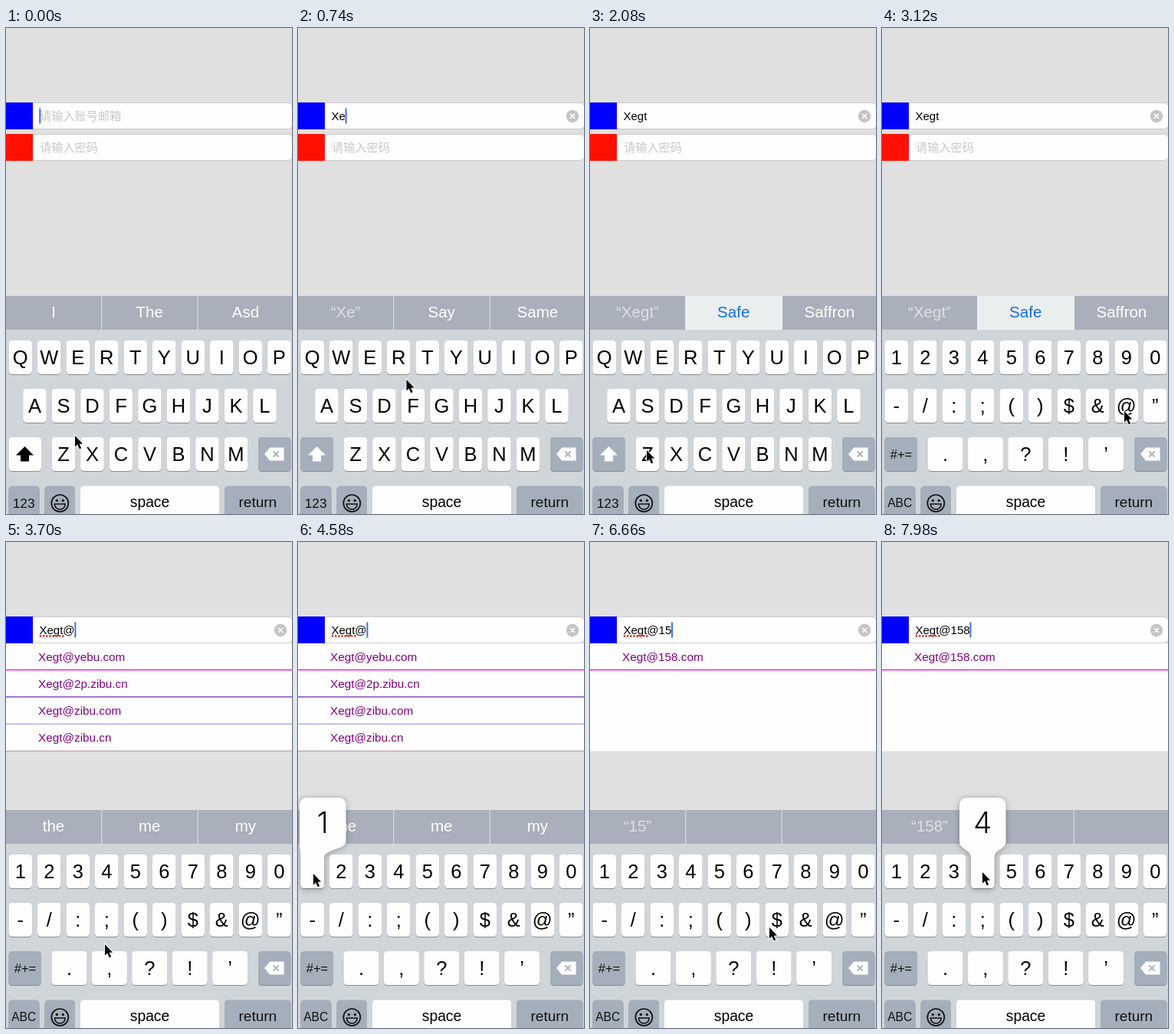
An HTML page with a canvas for the animation above (8000 ms loop, 373 px wide and 633 px high).

```html
<!DOCTYPE html>
<html lang="zh">
<head>
<meta charset="utf-8">
<style>
html, body { margin: 0; width: 100%; height: 100%; overflow: hidden; background: #e0e0e0; }
canvas { display: block; width: 373px; height: 633px; }
</style>
</head>
<body>
<canvas id="stage"></canvas>
<script>
const W = 373, H = 633, LOOP = 8000, TICK = 147.9;
const SANS = '"Liberation Sans", sans-serif';
const CJK = '"Noto Sans CJK SC", "Noto Sans CJK", sans-serif';
const GRAY_KEY = '#a5aebb', BAR = '#a9b0bb';

const canvas = document.getElementById('stage');
const ctx = canvas.getContext('2d');
const dpr = window.devicePixelRatio || 1;
canvas.width = W * dpr;
canvas.height = H * dpr;
ctx.scale(dpr, dpr);

// All schedules are [tick, value...]; the latest entry reached is current.
const typed = [[0, ''], [3, 'X'], [5, 'Xe'], [7, 'Xeg'], [10, 'Xegt'],
  [23, 'Xegt@'], [32, 'Xegt@1'], [43, 'Xegt@15'], [52, 'Xegt@158']];
const hints = [[0, 'I', 'The', 'Asd'], [3, '“X”', 'Say', 'See'], [5, '“Xe”', 'Say', 'Same'],
  [7, '“Xeg”', 'Safe', 'Sailor'], [10, '“Xegt”', 'Safe', 'Saffron'], [23, 'the', 'me', 'my'],
  [33, '“1”', '', ''], [43, '“15”', '', ''], [52, '“158”', '', '']];
const pointer = [[0, 90, 531], [2, 114, 550], [4, 95, 432], [6, 188, 484], [8, 189, 483],
  [9, 170, 432], [11, 170, 436], [16, 22, 612], [17, 22, 612], [21, 316, 499], [22, 316, 495],
  [25, 129, 524], [30, 20, 432], [32, 20, 432], [35, 39, 448], [40, 60, 445], [42, 168, 432],
  [43, 168, 434], [45, 234, 502], [48, 335, 540], [51, 282, 432], [52, 280, 433], [54, 131, 430]];
const presses = { 2: 'X', 4: 'E', 6: 'G', 9: 'T', 22: '@', 31: '1', 42: '5', 51: '8', 54: '4' };
const NUMBERS_AT = 17, LIST_AT = 23;

const domains = ['yebu.com', '2p.zibu.cn', 'zibu.com', 'zibu.cn', '172.com', '158.com', '134.com'];
const ruleColors = ['#f200dc', '#6c22ae', '#9c9cf4', '#b8a0a0'];

const current = (list, n) => list.filter(e => e[0] <= n).pop();

function text(str, x, y, size, color, align = 'center', family = SANS) {
  ctx.font = `${size}px ${family}`;
  ctx.fillStyle = color;
  ctx.textAlign = align;
  ctx.fillText(str, x, y);
}

function rect(x, y, w, h, color) {
  ctx.fillStyle = color;
  ctx.fillRect(x, y, w, h);
}

function round(x, y, w, h, r, color) {
  ctx.fillStyle = color;
  ctx.beginPath();
  ctx.roundRect(x, y, w, h, r);
  ctx.fill();
}

function disc(x, y, r, color) {
  ctx.fillStyle = color;
  ctx.beginPath();
  ctx.arc(x, y, r, 0, 7);
  ctx.fill();
}

function polygon(points, color) {
  ctx.fillStyle = color;
  ctx.beginPath();
  points.forEach(([x, y]) => ctx.lineTo(x, y));
  ctx.closePath();
  ctx.fill();
}

function cross(x, y, r, color, width) {
  ctx.strokeStyle = color;
  ctx.lineWidth = width;
  ctx.beginPath();
  ctx.moveTo(x - r, y - r); ctx.lineTo(x + r, y + r);
  ctx.moveTo(x + r, y - r); ctx.lineTo(x - r, y + r);
  ctx.stroke();
}

function key(x, y, w, color = '#fefefe') {
  round(x, y + 1, w, 44, 4.5, '#8b8f94');
  round(x, y, w, 44, 4.5, color);
}

function field(y, swatch) {
  round(0, y, W, 35, 5, '#cdcdcd');
  round(0.5, y + 1, W - 0.5, 33, 5, '#fefefe');
  rect(0, y, 35, 35, swatch);
}

function drawFields(n) {
  const [since, value] = current(typed, n);
  field(97, '#0000ff');
  field(138, '#ff1000');
  text('请输入密码', 44, 161, 15.2, '#c9c9cd', 'left', CJK);
  if (value) {
    text(value, 43.5, 120, 15, '#000', 'left');
    disc(358, 115, 8.2, '#c4c4c6');
    cross(358, 115, 3, '#fff', 1.7);
  } else {
    text('请输入账号邮箱', 44, 120, 15.2, '#c9c9cd', 'left', CJK);
  }
  if (n >= LIST_AT) {
    for (let x = 45; x < 76; x += 4.2) disc(x, 122.5, 1.4, '#e8392c');
  }
  if ((n - since) % 7 < 4) {
    ctx.font = `15px ${SANS}`;
    rect(43.3 + ctx.measureText(value).width, 104.5, 2, 20, '#426bf2');
  }
}

function drawList(n) {
  if (n < LIST_AT) return;
  const prefix = current(typed, n)[1].split('@')[1];
  const matches = prefix ? domains.filter(d => d.startsWith(prefix)) : domains.slice(0, 4);
  rect(0, 132, W, 140.5, '#fefefe');
  rect(35, 131, W - 35, 1, '#cfcfcf');
  matches.forEach((domain, i) => {
    text('Xegt@' + domain, 42, 155 + 35 * i, 15.3, '#800080', 'left');
    rect(0, 166 + 35.2 * i, W, 1.2, ruleColors[i]);
  });
}

function drawHints(n) {
  const [since, ...words] = current(hints, n);
  const corrected = since === 10;
  rect(0, 349, W, 44, BAR);
  rect(124, 349, 1.3, 44, '#d3d8dd');
  rect(249.6, 349, 1.3, 44, '#d3d8dd');
  if (corrected) rect(124, 349, 127, 44, '#ebeeef');
  words.forEach((word, i) => {
    const color = word[0] === '“' ? '#dce0e4' : corrected && i === 1 ? '#126fe6' : '#fff';
    text(word, 62 + 125.2 * i, 376.5, 20.5, color);
  });
}

function layout(n) {
  const row = (chars, x, y, pitch = 37.5, w = 30.5) =>
    [...chars].map((label, i) => ({ label, x: x + pitch * i, y, w }));
  return n >= NUMBERS_AT
    ? [...row('1234567890', 3.5, 407), ...row('-/:;()$&@”', 3.5, 470), ...row('.,?!’', 59.5, 533, 52.4, 46)]
    : [...row('QWERTYUIOP', 3.5, 407), ...row('ASDFGHJKL', 22.2, 470), ...row('ZXCVBNM', 59.7, 533)];
}

function drawShift(active) {
  key(3.5, 533, 42.5, active ? '#fefefe' : GRAY_KEY);
  polygon([[24.5, 545], [36, 556.5], [30, 556.5], [30, 564.5], [19, 564.5], [19, 556.5], [13, 556.5]],
    active ? '#000' : '#fff');
}

function drawSmiley(x, y) {
  ctx.strokeStyle = '#111';
  ctx.lineWidth = 1.7;
  ctx.beginPath();
  ctx.arc(x, y, 11, 0, 7);
  ctx.stroke();
  disc(x - 4, y - 3.5, 1.7, '#111');
  disc(x + 4, y - 3.5, 1.7, '#111');
  ctx.lineWidth = 1.5;
  ctx.beginPath();
  ctx.arc(x, y + 1, 7, 0, Math.PI);
  ctx.closePath();
  ctx.stroke();
}

function drawKeyboard(n) {
  const numbers = n >= NUMBERS_AT;
  rect(0, 393, W, 240, '#d0d5d9');
  const keys = layout(n);
  const pressed = keys.find(k => k.label === presses[n]);
  for (const k of keys) {
    key(k.x, k.y, k.w);
    if (k !== pressed) text(k.label, k.x + k.w / 2, k.y + 31, 25.5, '#000');
  }
  if (numbers) {
    key(3.5, 533, 42.5, GRAY_KEY);
    text('#+=', 25, 561, 16.5, '#111');
  } else {
    drawShift(n < 3);
  }
  key(329, 533, 42.5, GRAY_KEY);
  polygon([[337, 555], [344, 546.5], [362.5, 546.5], [362.5, 563.5], [344, 563.5]], '#fff');
  cross(352, 555, 3.6, GRAY_KEY, 1.8);

  key(3.5, 596.5, 40, GRAY_KEY);
  text(numbers ? 'ABC' : '123', 23.2, numbers ? 624 : 625, numbers ? 15.6 : 17.4, '#111');
  key(50.5, 596.5, 39.5, GRAY_KEY);
  drawSmiley(70.3, 619);
  key(97, 596.5, 181, '#fefefe');
  text('space', 187.5, 624, 19.3, '#000');
  key(285, 596.5, 86.5, GRAY_KEY);
  text('return', 328.3, 624, 19, '#111');
  if (pressed) drawBubble(pressed, n);
}

// Enlarged key cap with a curved neck down to the pressed key.
function drawBubble({ label, x, y, w }, n) {
  const left = Math.min(Math.max(x - 15, 2), W - 62), right = left + 60.5;
  const top = y - 74, shoulder = y - 17, neck = y + 4, end = x + w, bottom = y + 44;
  ctx.save();
  ctx.shadowColor = 'rgba(0,0,0,.3)';
  ctx.shadowBlur = 9 * dpr;
  ctx.shadowOffsetY = dpr;
  ctx.fillStyle = '#fefefe';
  ctx.beginPath();
  ctx.moveTo(left + 9, top);
  ctx.arcTo(right, top, right, shoulder, 9);
  ctx.lineTo(right, shoulder);
  ctx.bezierCurveTo(right, shoulder + 11, end, neck - 11, end, neck);
  ctx.arcTo(end, bottom, x, bottom, 4.5);
  ctx.arcTo(x, bottom, x, neck, 4.5);
  ctx.lineTo(x, neck);
  ctx.bezierCurveTo(x, neck - 11, left, shoulder + 11, left, shoulder);
  ctx.arcTo(left, top, right, top, 9);
  ctx.fill();
  ctx.restore();
  const shown = n > 3 ? label.toLowerCase() : label;
  ctx.font = '300 38px Inter, sans-serif';
  ctx.fillStyle = '#000';
  ctx.textAlign = 'center';
  ctx.fillText(shown, (left + right) / 2, y - 28);
}

function drawPointer(n) {
  const from = current(pointer, n);
  const to = pointer[pointer.indexOf(from) + 1] || from;
  const u = to === from ? 0 : (n - from[0]) / (to[0] - from[0]);
  const ease = u * u * (3 - 2 * u);
  ctx.save();
  ctx.translate(from[1] + (to[1] - from[1]) * ease, from[2] + (to[2] - from[2]) * ease);
  ctx.beginPath();
  [[0, 0], [0, 14.5], [3.2, 11.6], [5.8, 17.2], [8.2, 16.2], [5.7, 10.7], [10, 10.5]]
    .forEach(([x, y]) => ctx.lineTo(x, y));
  ctx.closePath();
  ctx.lineWidth = 1.8;
  ctx.strokeStyle = '#fff';
  ctx.stroke();
  ctx.fillStyle = '#000';
  ctx.fill();
  ctx.restore();
}

function draw(now) {
  const n = Math.min(54, Math.floor((now % LOOP + 8) / TICK));
  rect(0, 0, W, H, '#e0e0e0');
  drawFields(n);
  drawList(n);
  drawHints(n);
  drawKeyboard(n);
  drawPointer(n);
}

const start = performance.now();
function loop() {
  draw(performance.now() - start);
  requestAnimationFrame(loop);
}
loop();
</script>
</body>
</html>
```
